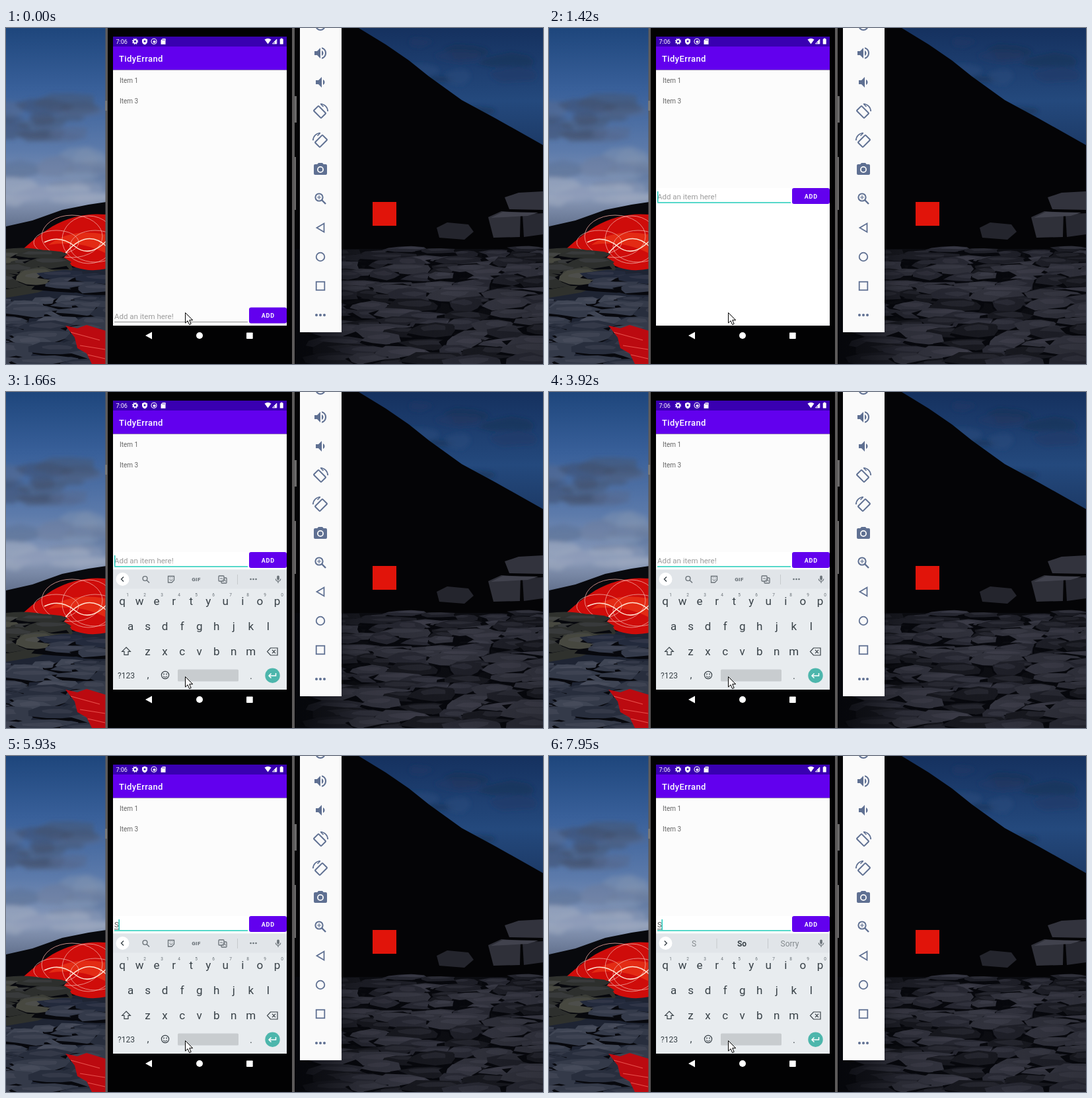
An HTML page that plays this animation: 813x508 px, repeating every 8 s.

```html
<!DOCTYPE html>
<html lang="en">
<head>
<meta charset="utf-8">
<title>Todo list demo</title>
<style>
  html, body { margin: 0; width: 100%; height: 100%; overflow: hidden; background: #000; }
  svg { display: block; width: 100%; height: 100%; }
  text { font-family: Roboto, sans-serif; }
  .mid { text-anchor: middle; }
</style>
</head>
<body>
<svg id="stage" viewBox="0 0 813 508" preserveAspectRatio="none"></svg>
<script>
const LOOP = 8000;
const stage = document.getElementById('stage');

let seed = 11;
const rand = (a = 0, b = 1) => {
  seed = (seed * 16807) % 2147483647;
  return a + (b - a) * seed / 2147483647;
};

// Markup helpers
const rect = (x, y, w, h, fill, more = '') =>
  `<rect x="${x}" y="${y}" width="${w}" height="${h}" fill="${fill}" ${more}/>`;
const disc = (x, y, r, fill, more = '') =>
  `<circle cx="${x}" cy="${y}" r="${r}" fill="${fill}" ${more}/>`;
const path = (d, fill, more = '') => `<path d="${d}" fill="${fill}" ${more}/>`;
const line = (d, stroke, w = 1, more = '') =>
  `<path d="${d}" fill="none" stroke="${stroke}" stroke-width="${w}" ${more}/>`;
const text = (x, y, size, fill, str, more = '') =>
  `<text x="${x}" y="${y}" font-size="${size}" fill="${fill}" ${more}>${str}</text>`;
const mid = (x, y, size, fill, str, more = '') =>
  text(x, y, size, fill, str, `class="mid" ${more}`);
const icon = (x, y, d, fill) => path(d, fill, `transform="translate(${x - 12} ${y - 12})"`);
const group = (id, body, more = '') => `<g id="${id}" ${more}>${body}</g>`;
const gradient = (id, stops, more = 'x2="0" y2="1"') =>
  `<linearGradient id="${id}" ${more}>` + stops.map(([at, c, o = 1]) =>
    `<stop offset="${at}" stop-color="${c}" stop-opacity="${o}"/>`).join('') + '</linearGradient>';

function blob(x, y, rx, ry, fill, more) {
  const n = 9, pts = [];
  for (let i = 0; i < n; i++) {
    const a = i / n * Math.PI * 2, k = rand(0.7, 1.2);
    pts.push((x + rx * k * Math.cos(a)).toFixed(1) + ' ' + (y + ry * k * Math.sin(a)).toFixed(1));
  }
  return path('M' + pts.join('L') + 'Z', fill, more);
}

// Flat slabs that grow towards the viewer, each over its own dark gap
function rocks(x0, x1, y0, y1, shades) {
  let out = '';
  for (let y = y0, near = 0; y < y1; y += 9 + near * 7) {
    near = (y - y0) / (y1 - y0);
    for (let x = x0 + rand(-20, 10); x < x1 + 20; x += rand(26, 70) + near * 16) {
      const rx = rand(18, 46) + near * 14, ry = rand(4, 9) + near * 5, dy = y + rand(-5, 5);
      out += blob(x, dy + 3, rx + 2, ry + 1, '#07080d');
      out += blob(x, dy, rx, ry, shades[Math.floor(rand(0, shades.length))]);
      out += blob(x + rand(-8, 8), dy - ry * 0.3, rx * 0.6, ry * 0.4, '#6a6c7c', 'opacity=".18"');
    }
  }
  return out;
}

function clouds(x0, x1, y0, y1, count, shades) {
  let out = '';
  for (let i = 0; i < count; i++) {
    out += blob(rand(x0, x1), rand(y0, y1), rand(18, 48), rand(6, 15),
      shades[i % shades.length], 'opacity=".5"');
  }
  return `<g filter="url(#soft)">${out}</g>`;
}

function wallpaper() {
  const glow = [[100, 315, 46, 32], [125, 320, 40, 36], [76, 324, 34, 18], [135, 330, 38, 24]];
  return rect(0, 0, 813, 508, '#040406') +
    // left: sky, far hill, lights, shore
    rect(0, 0, 152, 310, 'url(#skyL)') +
    clouds(0, 150, 110, 170, 14, ['#3f4d69', '#475672', '#56698d']) +
    clouds(0, 150, 190, 240, 12, ['#7f91b0', '#5f769e', '#6f7f9c']) +
    clouds(0, 150, 235, 265, 8, ['#a3aec2', '#8f9dba']) +
    path('M0 300L40 291L85 275L125 267L152 263V380H0Z', '#08090d') +
    rect(0, 362, 152, 146, '#1e2433') +
    path('M26 334Q48 314 70 300Q108 278 152 282V364Q112 372 84 350Q56 336 26 334Z', '#cf0c0a') +
    path('M64 328Q98 302 150 312V340Q110 320 64 328Z', '#f2401c', 'opacity=".6"') +
    glow.map(([x, y, rx, ry]) =>
      `<ellipse cx="${x}" cy="${y}" rx="${rx}" ry="${ry}" fill="none" stroke="#f0a8a0" stroke-width=".8"/>`).join('') +
    line('M58 324Q82 312 104 330T152 322M84 348Q120 300 152 330', '#ffe2d0', 1.6) +
    path('M0 334Q30 330 58 336Q96 344 101 364Q88 386 48 400L0 408Z', '#2f312d') +
    rocks(0, 56, 346, 388, ['#3b3d37', '#474840', '#2d2f2d']) +
    rocks(100, 150, 372, 405, ['#2a3042', '#232a3c', '#343a4a']) +
    rocks(0, 150, 412, 508, ['#343a49', '#3f4554', '#282e3d']) +
    path('M90 450L108 454L122 449L152 458V508H130L122 492L108 484L104 468Z', '#bb0a10') +
    line('M98 460L142 472M112 480L150 486M124 494L150 500', '#e8504c', 1.2) +
    // right: sky, headland, shore
    path('M508 0H813V184Z', 'url(#skyR)') +
    clouds(620, 810, 10, 130, 10, ['#1c3054', '#223b66', '#2a4c7c']) +
    path('M437 0H534L575 25L610 49L640 73L690 109L740 136L813 177V335H437Z', '#040406') +
    rect(437, 334, 376, 174, '#0c0d12') +
    rocks(510, 813, 338, 508, ['#2c2d38', '#363742', '#22232c', '#1a1b22', '#3a3b47']) +
    rect(437, 334, 376, 174, 'url(#dusk)') +
    path('M652 302L668 294L700 297L708 308L694 320L656 317Z', '#24252d') +
    path('M730 286L750 277L779 279L778 316L738 317Z', '#2f3039') +
    path('M782 282L813 280V312L784 316Z', '#282932') +
    path('M755 256L776 249L813 247V275L762 274Z', '#32333d') +
    path('M734 287L752 278L806 279L790 284Z', '#41424d') +
    rect(555, 263, 36, 36, '#e1140a');
}

function toolPanel() {
  const c = '#5f7092', x = 476;
  const cone = 'v6h4l5 5V4l-5 5z';
  const wave = 'c0-1.8-1-3.3-2.5-4v8c1.5-.7 2.5-2.25 2.5-4z';
  const rotate = (y, flip) => `<g transform="translate(${x} ${y}) scale(${flip} 1)">` +
    rect(-8, -5.2, 16, 10.4, 'none', `rx="1" stroke="${c}" stroke-width="2" transform="translate(-1 1) rotate(45)"`) +
    line('M0 -11.2A11.2 11.2 0 0 1 11.2 0M0.500 -11l4 4', c, 1.6) + '</g>';
  return rect(445, 0, 63, 460, '#fafafa') +
    disc(x, -4, 7, 'none', `stroke="${c}" stroke-width="2"`) +
    icon(x, 38, `M3 9${cone}M16.5 12${wave}M14 3.2v2.1a7 7 0 0 1 0 13.4v2.1a9 9 0 0 0 0-17.6z`, c) +
    icon(x, 82, `M5 9${cone}M18.5 12${wave}`, c) +
    rotate(126, 1) + rotate(170, -1) +
    icon(x, 214, 'M9 2L7.2 4H4a2 2 0 0 0-2 2v12a2 2 0 0 0 2 2h16a2 2 0 0 0 2-2V6a2 2 0 0 0-2-2h-3.2L15 2z', c) +
    disc(x, 214, 5, '#fafafa') + disc(x, 214, 3.2, c) +
    disc(474, 256, 5.6, 'none', `stroke="${c}" stroke-width="2"`) +
    line('M478 260L484 266', c, 2.4) + line('M471 256h6M474 253v6', c, 1.2) +
    line('M481.5 295.5V308.5L470.5 302Z', c, 1.8) +
    disc(x, 346, 6.3, 'none', `stroke="${c}" stroke-width="1.8"`) +
    rect(469.7, 383.7, 12.6, 12.6, 'none', `stroke="${c}" stroke-width="1.8"`) +
    [-6, 0, 6].map(d => disc(x + d, 434, 2, c)).join('');
}

function phone() {
  const w = '#fff';
  return rect(150.5, 0, 286.5, 508, '#5c5a5a') + rect(154, 0, 279, 508, '#020203') +
    rect(150, 110, 3, 15, '#777') + rect(437, 103, 3, 40, '#6b6a6a') + rect(437, 195, 2, 80, '#6b6a6a') +
    rect(162, 13, 263, 15, '#3900b1') + rect(162, 64, 263, 386, '#fcfcfc') +
    rect(162, 28, 263, 35.5, '#6200ee') + rect(162, 63.5, 263, 0.5, '#fcfcfc') +
    text(166.5, 24, 9, w, '7:06') +
    disc(195.5, 20.3, 2.6, 'none', `stroke="${w}" stroke-width="1.8"`) +
    disc(195.5, 20.3, 4, 'none', `stroke="${w}" stroke-width="1.3" stroke-dasharray="1.6 1.54"`) +
    path('M210 15.5l4 1.7v3q0 3.5-4 5q-4-1.5-4-5v-3z', w) + disc(210, 20, 1.5, '#3900b1') +
    disc(224, 20.3, 4, 'none', `stroke="${w}" stroke-width="1.1"`) + disc(224.5, 20.8, 2, w) +
    path('M237 16h4.5v8.8h-7v-6z', w) + line('M237.5 17v2M239.5 17v2', '#3900b1', 0.8) +
    path('M391.5 17.5q5-3.6 10 0l-5 6.7z', w) +
    line('M403.5 23.8h6.3v-6.8z', w, 1) + path('M406.5 24v-3.5l3-3.3V24z', w) +
    rect(414.7, 16.5, 5, 8, w, 'rx=".6"') + rect(416, 15.6, 2.4, 1.5, w) +
    text(171, 51, 13, w, 'TidyErrand', 'font-weight="500" letter-spacing=".4"') +
    text(172, 83, 10, '#666', 'Item 1') + text(172, 114, 10, '#666', 'Item 3');
}

function entryRow() {
  return text(164, 439.5, 11.5, '#9c9c9c', 'Add an item here!', 'id="hint"') +
    group('typed', text(164, 439.5, 11.5, '#555', 'S') + line('M164 442.3h7', '#555')) +
    line('M164 444.5H366', '#8c8c8c', 1, 'id="rule"') +
    rect(164, 427.5, 1.4, 16, '#0fc4b4', 'id="caret"') +
    rect(368, 422.5, 57, 24, '#6200ee', 'rx="3"') +
    mid(396.8, 438, 9, '#fff', 'ADD', 'font-weight="700" letter-spacing=".7"');
}

function keyboard() {
  const ink = '#384147', soft = '#6a7278';
  const rows = [['qwertyuiop', 176, 321.5], ['asdfghjkl', 188.5, 359.5], ['zxcvbnm', 214.5, 397.5]];
  const keys = rows.map(([chars, x, y]) => [...chars].map((ch, i) =>
    mid(x + i * 26.05, y, 17, ink, ch, 'data-key')).join('')).join('');
  const digits = [...'1234567890'].map((d, i) => mid(184 + i * 26, 308.5, 6.5, soft, d)).join('');
  const divider = x => line(`M${x} 276v15`, '#c6cacd');
  const box = (x, y) => rect(x, y, 8, 8, '#e1e5e9', `rx="1" stroke="${soft}" stroke-width="1.3"`);
  const tools = disc(210.5, 282, 3.4, 'none', `stroke="${soft}" stroke-width="1.4"`) +
    line('M213 284.5l4 4', soft, 1.5) +
    line('M245.5 278.5h9v6l-3.5 3.5h-5.5z', soft, 1.3) + line('M247.5 283.5q2.5 3 5 0M248 281h1M251 281h1', soft) +
    mid(288, 286, 8, soft, 'GIF', 'font-weight="900" letter-spacing=".4"') +
    box(326, 281) + box(322, 278) + line('M324 282h4M327.5 285l3-2.5l2 4', soft) +
    divider(350.5) + [-4, 0, 4].map(d => disc(374.5 + d, 283, 1.3, soft)).join('');
  const words = mid(219.5, 287.5, 12, '#82888c', 'S') + mid(292, 287.5, 12, ink, 'So', 'font-weight="700"') +
    mid(364.5, 287.5, 12, '#82888c', 'Sorry') + divider(254) + divider(331.5);
  return rect(162, 268.5, 263, 181.5, '#e8ecef') + rect(162, 268.5, 263, 29, '#e1e5e9') +
    disc(176.5, 283, 10, '#fff') + line('M178 279.5l-3.5 3.5l3.5 3.5', ink, 1.4, 'id="chevron"') +
    group('tools', tools) + group('words', words) +
    rect(410.2, 277.5, 3.6, 7, soft, 'rx="1.8"') + line('M408.3 282.5a3.7 3.7 0 0 0 7.4 0M412 286v3', soft, 1.2) +
    keys + digits +
    line('M182 386l6.3 6.3h-3.3v5h-6v-5h-3.3z', ink, 1.2) +
    line('M400.5 387h10.5v11h-10.5l-5-5.5zM403 389.8l5 5.4M408 389.8l-5 5.4', ink, 1.2) +
    mid(182, 433, 12, ink, '?123') + mid(215, 433, 15, ink, ',') + mid(371, 433.5, 15, ink, '.') +
    disc(241, 428, 5.6, 'none', `stroke="${ink}" stroke-width="1.2"`) +
    disc(239, 426.5, 0.9, ink) + disc(243, 426.5, 0.9, ink) + line('M238 429.5q3 3.6 6 0', ink, 1.1) +
    rect(260, 419.5, 92, 18, '#c8cccf', 'rx="1.5"') +
    disc(403.5, 428.7, 11.2, '#4db6ac') +
    line('M408.5 425v4h-10M401.5 425.5l-3.5 3.5l3.5 3.5', '#fff', 1.5);
}

const navButtons = path('M221 459.5v11l-10-5.5z', '#fff') + disc(293, 465, 5, '#fff') +
  rect(364, 460.5, 9.7, 9.5, '#fff', 'rx=".8"');

stage.innerHTML = '<defs>' +
  gradient('skyL', [[0, '#1e467c'], [0.3, '#39609a'], [0.6, '#5d7bab'], [0.82, '#8b9bb9'], [1, '#5a6884']]) +
  gradient('skyR', [[0, '#15315f'], [0.6, '#24497d'], [1, '#1c3965']]) +
  gradient('dusk', [[0, '#040509', 0.8], [0.25, '#040509', 0.25], [0.6, '#040509', 0.1], [1, '#040509', 0.25]], '') +
  '<filter id="soft"><feGaussianBlur stdDeviation="3"/></filter></defs>' +
  wallpaper() + toolPanel() + phone() +
  rect(162, 242, 263, 208, '#fff', 'id="blank"') +
  group('entry', entryRow()) +
  rect(162, 449, 263, 29, '#fff', 'id="under"') +
  group('board', keyboard()) +
  rect(162, 449.5, 263, 28.5, '#000', 'id="shade" opacity=".4"') +
  navButtons +
  path('M271.5 430.5v15.5l3.6-3.3l2.5 5.8l2.6-1.1l-2.5-5.7h5z', '#fff', 'stroke="#000" stroke-width="1"');

const el = {};
stage.querySelectorAll('[id]').forEach(n => el[n.id] = n);
const keys = [...stage.querySelectorAll('[data-key]')];
const letters = keys.map(k => k.textContent);
const show = (node, on) => node.setAttribute('display', on ? 'inline' : 'none');

const blinks = [310, 910, 1420, 1930, 2330, 2890, 3420, 3920, 4490, 4880, 5410, 6340, 6850, 7420, 7950];

function render(t) {
  const focus = t >= 310, lifted = t >= 1420, open = t >= 1540, settled = t >= 1660;
  const shift = t >= 5810 && t < 5930, typed = t >= 5930, suggest = t >= 6210;

  el.entry.setAttribute('transform', `translate(0 ${lifted ? -180.5 : 0})`);
  el.rule.setAttribute('stroke', focus ? '#1fcbb9' : '#8c8c8c');
  el.rule.setAttribute('stroke-width', focus ? 1.5 : 1);
  el.caret.setAttribute('x', typed ? 170.5 : 164);
  show(el.caret, blinks.filter(b => b <= t).length % 2);
  show(el.hint, !typed);
  show(el.typed, typed);

  show(el.blank, lifted);
  show(el.board, open);
  show(el.under, open && !settled);
  show(el.shade, open && !settled);
  el.board.setAttribute('opacity', settled ? 1 : 0.65);
  el.board.setAttribute('transform', `translate(0 ${settled ? 0 : 28})`);
  show(el.tools, settled && !suggest);
  show(el.words, suggest);
  el.words.setAttribute('opacity', t < 6340 ? 0.5 : 1);
  el.chevron.setAttribute('transform', settled && !suggest ? '' : 'rotate(180 176.4 283)');
  keys.forEach((k, i) => {
    const ch = shift ? letters[i].toUpperCase() : letters[i];
    if (k.textContent !== ch) k.textContent = ch;
  });
}

const start = performance.now();
function tick() {
  render((performance.now() - start) % LOOP);
  requestAnimationFrame(tick);
}
render(0);
requestAnimationFrame(tick);
</script>
</body>
</html>
```
